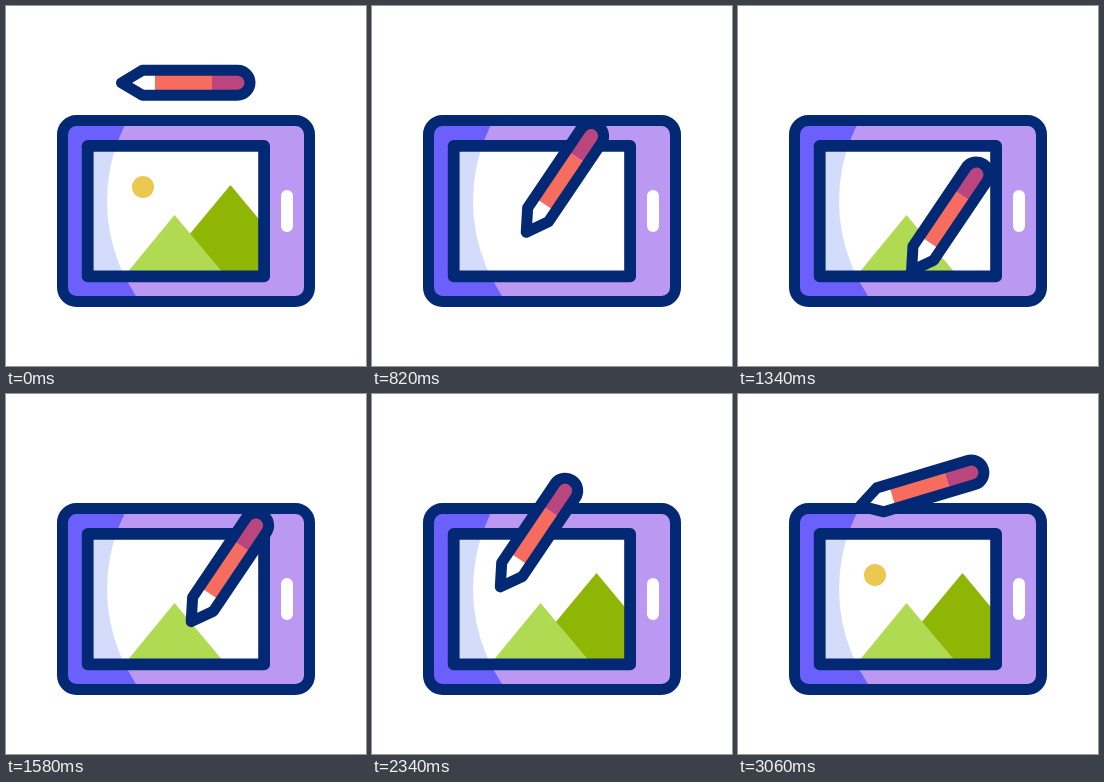
An HTML page with a canvas for the animation above (3080 ms loop, 360 px wide and 360 px high).

```html
<!DOCTYPE html>
<html lang="en">
<head>
<meta charset="utf-8">
<title>Drawing tablet</title>
<style>
html, body { margin: 0; width: 100%; height: 100%; overflow: hidden; background: #fff; }
canvas { display: block; }
</style>
</head>
<body>
<canvas id="stage" width="360" height="360"></canvas>
<script>
const ctx = document.getElementById('stage').getContext('2d');
const LOOP = 3080;
const NAVY = '#032975';
const TILT = -56;
const SUN = { x: 137, y: 181, r: 11, start: 80 };
const TRACE = { x: 136, y: 183, r: 12.5, from: 2286, to: 2700 };

const front = [[122.5, 265], [168.5, 209], [215.5, 265]];
const back = [[153, 265], [224.5, 179], [296, 265]];

const clamp = v => Math.max(0, Math.min(1, v));
const progress = (t, from, to) => clamp((t - from) / (to - from));
const rad = deg => deg * Math.PI / 180;

// Pencil tip on its way around the sun
function aroundSun(part) {
  const a = rad(SUN.start + 360 * part);
  return [TRACE.x + TRACE.r * Math.cos(a), TRACE.y + TRACE.r * Math.sin(a)];
}

// Pencil keys: time, tip x, tip y, angle
const sunEdge = aroundSun(0);
const keys = [
  [0, 115.5, 76.5, 0],
  [515, 122, 264, TILT],
  [600, 122, 264, TILT],
  [922, 169, 209, TILT],
  [1250, 215, 264, TILT],
  [1384, 154, 265, TILT],
  [1832, 225, 180, TILT],
  [2035, 256, 217, TILT],
  [TRACE.from, ...sunEdge, TILT],
  [TRACE.to, ...sunEdge, TILT],
  [3214, 115.5, 76.5, 0]
];

function pencilPose(t) {
  if (t > TRACE.from && t < TRACE.to) {
    return [...aroundSun(progress(t, TRACE.from, TRACE.to)), TILT];
  }
  const i = keys.findIndex(k => k[0] > t);
  const a = keys[i - 1], b = keys[i];
  const p = progress(t, a[0], b[0]);
  return [1, 2, 3].map(n => a[n] + (b[n] - a[n]) * p);
}

function box(x, y, w, h, r) {
  ctx.beginPath();
  ctx.roundRect(x, y, w, h, r);
}

function fill(color) {
  ctx.fillStyle = color;
  ctx.fill();
}

function outline(width = 11) {
  ctx.strokeStyle = NAVY;
  ctx.lineWidth = width;
  ctx.lineJoin = 'round';
  ctx.stroke();
}

// Two-tone panel split by a large circle
function panel(shape, left, right) {
  ctx.save();
  box(...shape);
  fill(left);
  ctx.clip();
  ctx.beginPath();
  ctx.arc(271, 195, 170, 0, 7);
  fill(right);
  ctx.restore();
}

// Fills the part of a peak traced so far, closed back to its start
function mountain([a, b, c], part, color) {
  const down = part * 2 - 1;
  if (down <= 0) return;
  ctx.beginPath();
  ctx.moveTo(...a);
  ctx.lineTo(...b);
  ctx.lineTo(b[0] + (c[0] - b[0]) * down, b[1] + (c[1] - b[1]) * down);
  fill(color);
}

function picture(backPart, frontPart, sunPart) {
  mountain(back, backPart, '#8fb505');
  mountain(front, frontPart, '#b1da53');
  if (sunPart > 0) {
    ctx.beginPath();
    ctx.arc(SUN.x, SUN.y, SUN.r, rad(SUN.start), rad(SUN.start + 360 * sunPart));
    fill('#ebc850');
  }
}

function tablet(t) {
  const body = [56.5, 114.5, 247, 181, 14];
  const screen = [81.7, 139.8, 176.4, 130.6, 0];
  panel(body, '#6b60fb', '#bb99f2');
  box(...body);
  outline();
  panel(screen, '#d4dcfb', '#fff');

  ctx.save();
  box(...screen);
  ctx.clip();
  if (t < 200) {
    ctx.globalAlpha = 1 - t / 200;
    picture(1, 1, 1);
  } else {
    picture(progress(t, 1384, 2040), progress(t, 600, 1163), progress(t, TRACE.from, TRACE.to));
  }
  ctx.restore();

  box(...screen);
  outline(11.8);
  box(275, 184, 12, 42, 6);
  fill('#fff');
}

function pencilPath() {
  ctx.beginPath();
  ctx.moveTo(0, 0);
  ctx.lineTo(21, -12.5);
  ctx.lineTo(116, -12.5);
  ctx.arc(116, 0, 12.5, -Math.PI / 2, Math.PI / 2);
  ctx.lineTo(21, 12.5);
  ctx.closePath();
}

function pencil(t) {
  const [x, y, angle] = pencilPose(t);
  ctx.save();
  ctx.translate(x, y);
  ctx.rotate(rad(angle));
  ctx.save();
  pencilPath();
  fill('#fff');
  ctx.clip();
  ctx.fillStyle = '#f66d5f';
  ctx.fillRect(33.5, -13, 57, 26);
  ctx.fillStyle = '#bb457f';
  ctx.fillRect(90.5, -13, 40, 26);
  ctx.restore();
  pencilPath();
  outline();
  ctx.restore();
}

function draw() {
  const t = performance.now() % LOOP;
  ctx.fillStyle = '#fff';
  ctx.fillRect(0, 0, 360, 360);
  tablet(t);
  pencil(t);
  requestAnimationFrame(draw);
}
draw();
</script>
</body>
</html>
```
